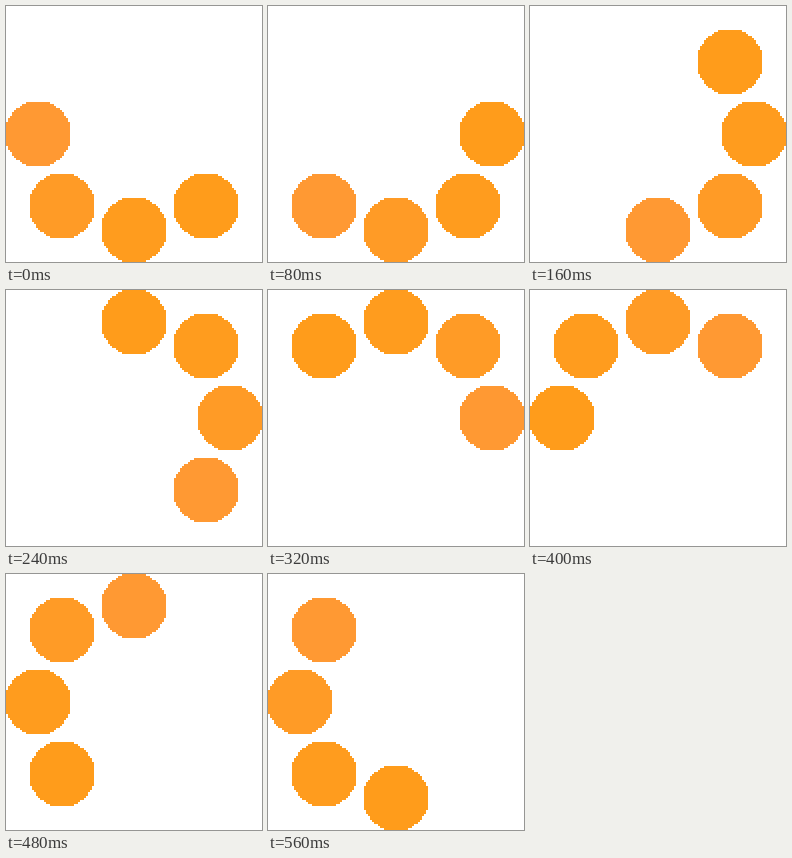
These frames come from a looping animation (256 by 256 pixels, 640 ms). An HTML page with a canvas:

```html
<!DOCTYPE html>
<html>
<head>
<meta charset="utf-8">
<style>
  html, body { margin: 0; width: 100%; height: 100%; overflow: hidden; background: #fff; }
  canvas { display: block; width: 100vmin; height: 100vmin; image-rendering: pixelated; }
</style>
</head>
<body>
<canvas width="128" height="128"></canvas>
<script>
const ctx = document.querySelector('canvas').getContext('2d');
const SIZE = 128;
const STEP_MS = 80;
const SLOTS = 8;
const DOTS = 4;
const RADIUS = 16;
const GRID = 12; // slot centres snap to this spacing

// Hard-edged disc, one pixel row at a time
function disc(cx, cy) {
  for (let y = -RADIUS; y < RADIUS; y++) {
    const half = Math.round(Math.sqrt((RADIUS + 0.5) ** 2 - (y + 0.5) ** 2));
    ctx.fillRect(cx - half, cy + y, half * 2, 1);
  }
}

// Slots run counter-clockwise from the left
function slotCentre(slot) {
  const angle = Math.PI * (1 - 2 * slot / SLOTS);
  const snap = v => SIZE / 2 + GRID * Math.round(4 * v);
  return [snap(Math.cos(angle)), snap(Math.sin(angle))];
}

// Tail is paler, head more saturated
function dotColor(i) {
  const fade = (1 - i / (DOTS - 1)) ** 2;
  return `rgb(255, ${Math.round(156 - 3 * fade)}, ${Math.round(27 + 24 * fade)})`;
}

function draw() {
  const step = Math.floor(performance.now() / STEP_MS) % SLOTS;
  ctx.clearRect(0, 0, SIZE, SIZE);
  for (let i = 0; i < DOTS; i++) {
    ctx.fillStyle = dotColor(i);
    disc(...slotCentre(step + i));
  }
  requestAnimationFrame(draw);
}
draw();
</script>
</body>
</html>
```
